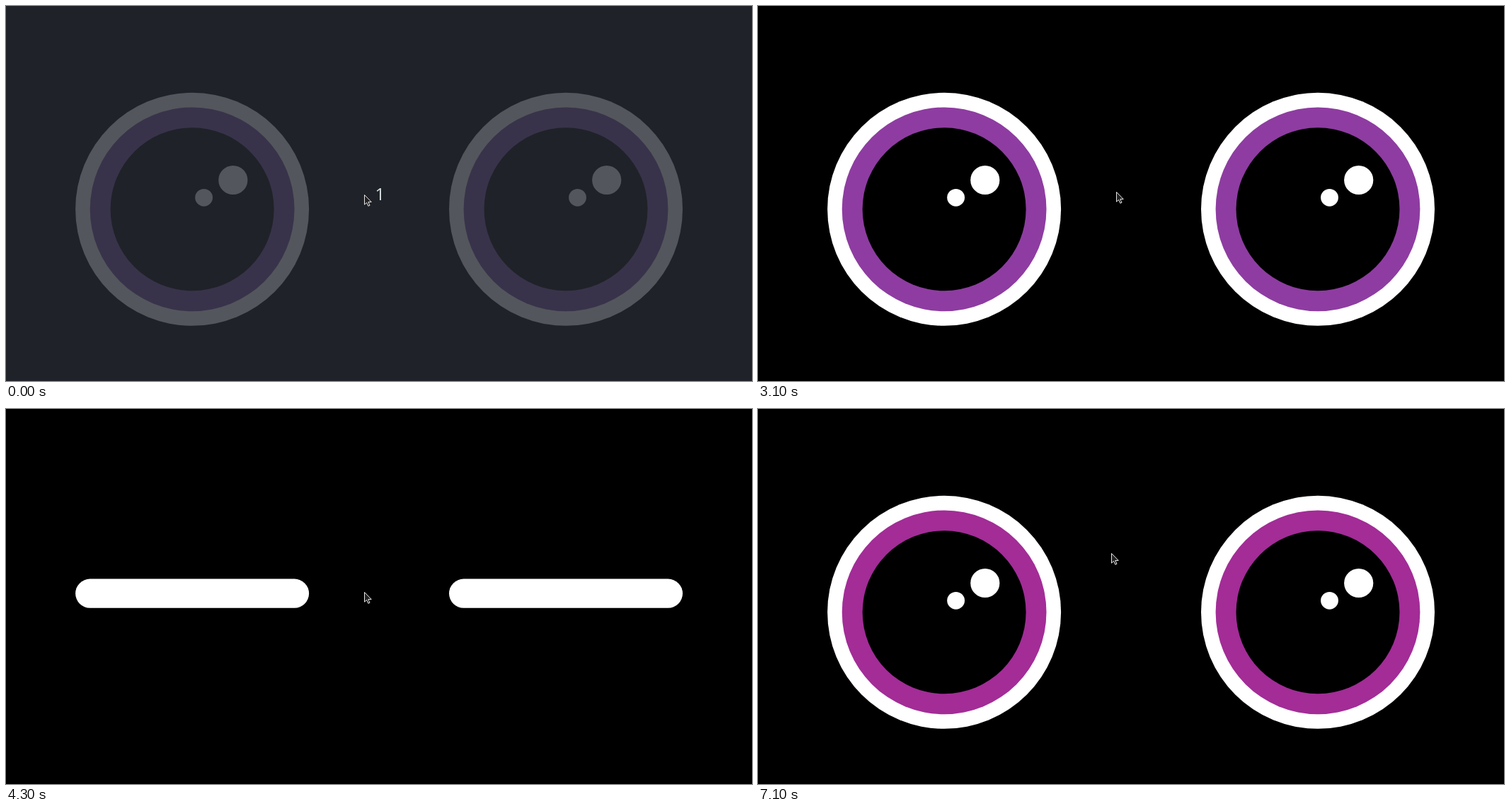
Animation of 1054x531 px, one loop 8 s. Source, as an HTML page:

```html
<!DOCTYPE html>
<html lang="en">
<head>
<meta charset="utf-8">
<title>Eyes</title>
<style>
  html, body { margin: 0; width: 100%; height: 100%; overflow: hidden; background: #000; }
  svg { display: block; width: 1054px; height: 531px; background: var(--back); }
  .back { fill: var(--back); }
  .light { fill: var(--light); }
  .iris { fill: var(--iris); }
  #count { font: 24px "Open Sans", sans-serif; fill: #d9e3e3; }
</style>
</head>
<body>
<svg id="stage" viewBox="0 0 1054 531">
  <defs>
    <g id="open">
      <circle class="light" r="165"/>
      <circle class="iris" r="144.4"/>
      <circle class="back" r="115.5"/>
      <circle class="light" cx="57.7" cy="-41.3" r="20.6"/>
      <circle class="light" cx="16.5" cy="-16.5" r="12.4"/>
    </g>
    <rect id="shut" class="light" x="-165" y="-47.2" width="330" height="41.2" rx="20.6"/>
  </defs>
  <use class="eye" href="#open" x="263.1" y="287.8"/>
  <use class="eye" href="#open" x="791" y="287.8"/>
  <text id="count" x="521.5" y="275">1</text>
  <path id="cursor" d="M.5 .5V14.2L3.6 11.4L5.8 16.3L8 15.3L5.8 10.5H10.2Z"
        fill="#222" stroke="#e6e6e6" stroke-width="1"/>
</svg>
<script>
const LOOP = 8000, STEP = 100, COUNT_END = 200;
const BLINK_START = 4300, BLINK_END = 4600;
const VIOLET = [117, 79, 173], MAGENTA = [163, 44, 151];

const byId = id => document.getElementById(id);
const stage = byId("stage"), count = byId("count"), cursor = byId("cursor");
const eyes = document.querySelectorAll(".eye");

const mix = (a, b, p) => a + (b - a) * p;
const progress = (t, from, to) => Math.min(1, Math.max(0, (t - from) / (to - from)));
const easeOut = p => Math.sin(p * Math.PI / 2);

// The hue drifts quickly at first, then ever more slowly.
function irisAt(t) {
  const p = ((t - COUNT_END) / 6900) ** 0.7;
  return `rgb(${VIOLET.map((c, i) => Math.round(mix(c, MAGENTA[i], p)))})`;
}

// A short nudge up, then a longer glide that bends left near its end.
function pointerAt(t) {
  const now = Math.floor(t / STEP) * STEP;
  const nudge = progress(now, 3000, 3200);
  const glide = easeOut(progress(now, 5800, 7100));
  return [506 - 7 * glide ** 3, 267 - 8 * nudge - 55 * glide].map(Math.round);
}

function draw(t) {
  const counting = t < COUNT_END;
  const shut = t >= BLINK_START && t < BLINK_END;

  stage.style.setProperty("--back", counting ? "#1f2228" : "#000");
  stage.style.setProperty("--light", counting ? "#53565c" : "#fff");
  stage.style.setProperty("--iris", counting ? "#38334a" : irisAt(t));
  count.style.display = counting ? "" : "none";
  eyes.forEach(eye => eye.setAttribute("href", shut ? "#shut" : "#open"));
  cursor.setAttribute("transform", `translate(${pointerAt(t)})`);
}

const start = performance.now();
function tick() {
  draw((performance.now() - start) % LOOP);
  requestAnimationFrame(tick);
}
tick();
</script>
</body>
</html>
```
